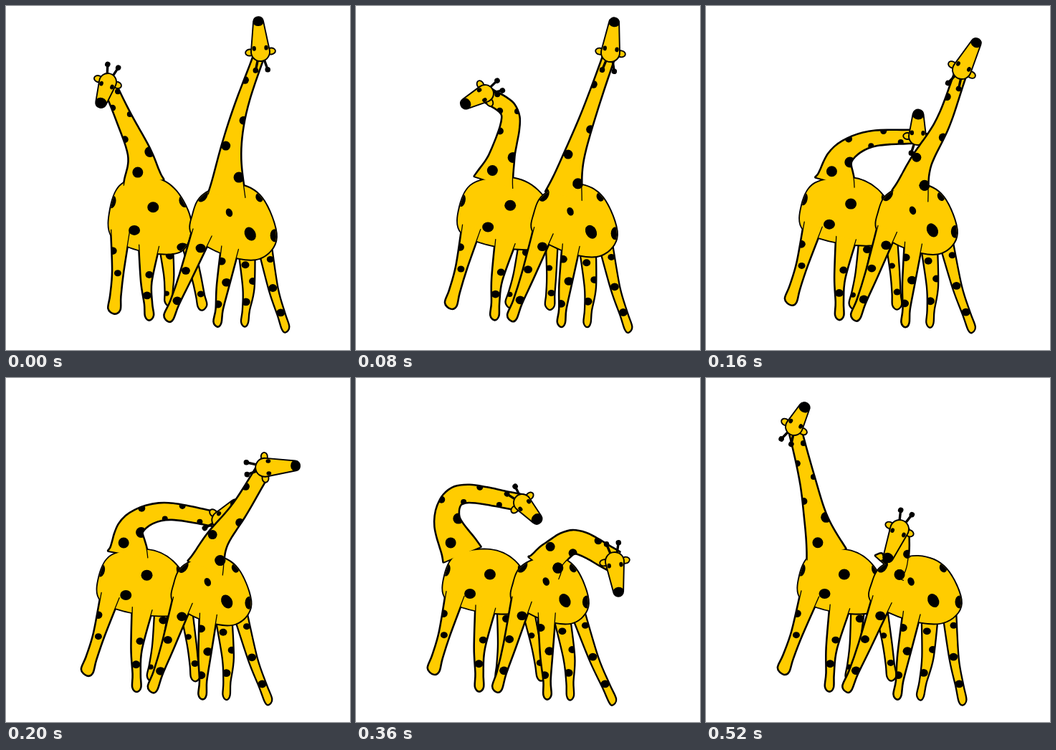
An HTML page with a canvas that plays this animation: 480x480 px, repeating every 600 ms.

```html
<!DOCTYPE html>
<html lang="en">
<head>
<meta charset="utf-8">
<title>Dancing giraffes</title>
<style>
html, body { margin: 0; width: 100%; height: 100%; overflow: hidden; background: #fff; }
canvas { display: block; }
</style>
</head>
<body>
<canvas id="stage" width="480" height="480"></canvas>
<script>
const ctx = document.getElementById('stage').getContext('2d');
const YELLOW = '#fc0', BLACK = '#000', TAU = Math.PI * 2;
const STEP = 40, LOOP = 600, LAST = 13, SETTLED = 7;
const KEYS = [0, 2, 4, 7, 9, 11, 13]; // steps of the key poses
const SPINE = [0, .4, .7, 1];         // places of the spine points along the neck

// Body outline, hips and body spots are fractions of the body box.
// Pose: box left and right, neck base x, two spine points, skull, nose angle, neck half width.
// Spots: body x, y, rx, ry, turn; neck along, across, radius; leg along, across, radius.
const left = {
  poses: [
    [146, 260, 192, 186, 205, 164, 155, 142, 106, 108, 9],
    [145, 280, 192, 205, 205, 215, 150, 180, 122, 152, 10],
    [134, 265, 180, 190, 208, 228, 186, 295, 182, 272, 9],
    [125, 245, 151, 150, 197, 195, 174, 270, 212, 380, 12],
    [124, 245, 148, 127, 195, 148, 162, 232, 174, 408, 11],
    [126, 248, 156, 127, 190, 125, 140, 175, 97, 393, 10],
    [131, 250, 168, 153, 195, 141, 140, 123, 68, 298, 8.5]],
  top: 238, bottom: [345, 328], neckY: 246, neckWidth: 28,
  skull: 12, muzzle: 7.5, face: 30,
  body: [[.02, .78], [0, .42], [.14, .1], [.52, .02], [.8, .19], [.98, .6], [.86, .97], [.4, .97]],
  bodySpots: [[.52, .4, 8, 7.5, 0], [.29, .7, 8, 7, 0], [.02, .33, 5, 9, .2],
    [.9, .32, 7, 9, -.3], [.88, .92, 8, 6, 0]],
  neckSpots: [[.15, -.3, 7.5], [.38, .9, 7.5], [.55, -.9, 5], [.7, .9, 4], [.8, -.9, 4.5], [.9, .8, 4]],
  far: [
    { hip: [.68, .92], from: [227, 412], to: [200, 417], bend: 2, ease: 2,
      w: [9, 6.5, 5, 5], spots: [[.3, .5, 6], [1.7, -.5, 4]] },
    { hip: [.95, .9], from: [274, 418], to: [259, 416], bend: 1, ease: .8,
      w: [8, 6, 5.5, 6], spots: [[.8, -.5, 4.5], [1.6, .2, 5]] }],
  near: [
    { hip: [.12, .7], from: [151, 423], to: [108, 407], bend: 1, ease: 1.7,
      w: [13, 7.5, 7, 8], spots: [[.5, -.9, 6], [1.05, 0, 5]] },
    { hip: [.47, .9], from: [200, 432], to: [172, 431], bend: -4, ease: .8,
      w: [14, 7, 5, 5.5], spots: [[.8, .4, 5.5], [1.4, -.1, 6]] }]
};

const right = {
  poses: [
    [260, 377, 308, 314, 200, 328, 140, 355, 64, 266, 7],
    [248, 364, 290, 303, 213, 325, 150, 355, 65, 277, 8],
    [240, 350, 285, 300, 218, 331, 162, 357, 89, 298, 8],
    [222, 326, 264, 282, 243, 314, 225, 369, 207, 480, 15],
    [219, 324, 262, 277, 245, 308, 229, 361, 256, 443, 15],
    [226, 336, 260, 268, 245, 293, 229, 317, 262, 462, 16],
    [231, 356, 256, 264, 256, 269, 237, 270, 211, 472, 13]],
  top: 246, bottom: [352, 341], neckY: 265, neckWidth: 26,
  skull: 13, muzzle: 7, face: 42,
  body: [[.01, .7], [.01, .42], [.14, .16], [.52, .03], [.83, .21], [1, .72], [.8, 1], [.4, .95]],
  bodySpots: [[.69, .68, 7.5, 10, -.5], [.44, .4, 4.5, 6, -.4], [.12, .17, 7, 10, .5],
    [.8, .2, 5, 6.5, -.4], [.98, .7, 6, 9, 0]],
  neckSpots: [[.17, .75, 7.5], [.42, -.6, 6.5], [.62, .9, 6], [.84, -.9, 5.5]],
  far: [
    { hip: [.65, .92], from: [333, 441], to: [299, 443], bend: 4, ease: 1.1,
      w: [11, 7.5, 4.5, 4.5], spots: [[.35, -.3, 5.5], [.8, .8, 5.5], [1.4, -.2, 6]] },
    { hip: [.87, .88], from: [390, 449], to: [358, 450], bend: -3, ease: 1.1,
      w: [9, 6, 5, 5], spots: [[.25, .5, 5], [.95, -.1, 6], [1.6, 0, 6]] }],
  near: [
    { hip: [.12, .66], from: [227, 434], to: [197, 432], bend: 1, ease: 1.1,
      w: [14, 8.5, 6, 6.5], spots: [[.36, .5, 7], [.87, -.3, 6], [1.6, .3, 6.5]] },
    { hip: [.45, .86], from: [295, 441], to: [267, 442], bend: -1, ease: 1.1,
      w: [12, 8, 4.5, 5], spots: [[.35, -.8, 6], [.9, .5, 6.5], [1.5, -.4, 6]] }]
};

const mix = (a, b, k) => a + (b - a) * k;
const between = (p, q, k) => [mix(p[0], q[0], k), mix(p[1], q[1], k)];
const sway = (step, ease) => 1 - (1 - Math.min(1, step / SETTLED)) ** ease;

// Smooth value of every number in the rows at x.
function spline(rows, keys, x) {
  let i = 0;
  while (i < keys.length - 2 && x >= keys[i + 1]) i++;
  const span = keys[i + 1] - keys[i], k = (x - keys[i]) / span;
  const slope = (j, n) => {
    const a = Math.max(j - 1, 0), b = Math.min(j + 1, keys.length - 1);
    return (rows[b][n] - rows[a][n]) / (keys[b] - keys[a]) * span;
  };
  return rows[i].map((v, n) => mix(v, rows[i + 1][n], k * k * (3 - 2 * k))
    + slope(i, n) * k * (1 - k) ** 2 - slope(i + 1, n) * k * k * (1 - k));
}

// Adds a curve through the points to a path.
function curve(path, pts, closed, join) {
  const n = pts.length;
  const at = i => closed ? pts[(i + n) % n] : pts[Math.max(0, Math.min(n - 1, i))];
  path[join ? 'lineTo' : 'moveTo'](...pts[0]);
  for (let i = 0; i < (closed ? n : n - 1); i++) {
    const [a, b, c, d] = [at(i - 1), at(i), at(i + 1), at(i + 2)];
    path.bezierCurveTo(b[0] + (c[0] - a[0]) / 6, b[1] + (c[1] - a[1]) / 6,
      c[0] - (d[0] - b[0]) / 6, c[1] - (d[1] - b[1]) / 6, c[0], c[1]);
  }
  return path;
}

// Point beside the line from a to b, at distance w from p.
function beside(p, a, b, w) {
  const d = Math.hypot(b[0] - a[0], b[1] - a[1]) || 1;
  return [p[0] - (b[1] - a[1]) / d * w, p[1] + (b[0] - a[0]) / d * w];
}

function stroke(path, width) {
  ctx.lineWidth = width;
  ctx.stroke(path);
}

function fill(path, color) {
  ctx.fillStyle = color;
  ctx.fill(path);
}

function oval(x, y, rx, ry = rx, turn = 0) {
  const path = new Path2D();
  path.ellipse(x, y, rx, ry, turn, 0, TAU);
  return path;
}

function drawSpots(area, spots) {
  ctx.save();
  ctx.clip(area);
  spots.forEach(s => fill(s, BLACK));
  ctx.restore();
}

function makeLeg(leg, place, step) {
  const hip = place(leg.hip), foot = between(leg.from, leg.to, sway(step, leg.ease));
  const knee = between(hip, foot, .52);
  knee[0] += leg.bend;
  const line = [hip, knee, between(knee, foot, .65), foot];
  const side = sign => line.map((p, i) =>
    beside(p, line[Math.max(0, i - 1)], line[Math.min(3, i + 1)], sign * leg.w[i]));
  const path = curve(new Path2D(), [...side(1), [foot[0], foot[1] + 6], ...side(-1).reverse()]);
  const spots = leg.spots.map(([u, across, r]) => {
    const [x, y] = u < 1 ? between(hip, knee, u) : between(knee, foot, u - 1);
    return oval(x + across * mix(leg.w[0], leg.w[1], Math.min(u, 1)), y, r, r * .9);
  });
  return { path, spots };
}

function makeNeck(giraffe, spine, width) {
  const at = u => spline(spine, SPINE, u);
  const edge = (u, across) => beside(at(u), at(u - .01), at(u + .01),
    across * mix(width, giraffe.neckWidth, (1 - u) ** 2));
  const side = across => Array.from({ length: 13 }, (_, i) => edge(i / 12, across));
  const front = side(-1), back = side(1);
  const path = curve(curve(new Path2D(), front), [...back].reverse(), false, true);
  path.closePath();
  const spots = giraffe.neckSpots.map(([u, across, r]) => oval(...edge(u, across), r));
  return { path, spots, lines: [front, back].map(e => curve(new Path2D(), e)) };
}

function drawHead({ skull, muzzle, face }, x, y, angle) {
  ctx.save();
  ctx.translate(x, y);
  ctx.rotate(angle * TAU / 360);
  for (const side of [-1, 1]) {
    const horn = new Path2D(), tip = [-skull * 1.95, side * skull * .65];
    horn.moveTo(-skull * .7, side * skull * .3);
    horn.lineTo(...tip);
    stroke(horn, 3.4);
    fill(oval(...tip, 3.8), BLACK);
    const ear = oval(0, side * skull * 1.15, 4.5, 6);
    fill(ear, YELLOW);
    stroke(ear, 1.9);
  }
  const shape = new Path2D(), lean = Math.acos((skull - muzzle) / face);
  shape.arc(0, 0, skull, lean, TAU - lean);
  shape.arc(face, 0, muzzle, -lean, lean);
  shape.closePath();
  fill(shape, YELLOW);
  drawSpots(shape, [oval(face + 1, 0, muzzle, muzzle + 1),
    ...[-1, 1].map(side => oval(skull * .4, side * skull * .65, 3.4, 2.7))]);
  stroke(shape, 1.9);
  ctx.restore();
}

function drawGiraffe(giraffe, step) {
  const [x0, x1, baseX, ax, ay, bx, by, headX, headY, angle, width] = spline(giraffe.poses, KEYS, step);
  const bottom = mix(...giraffe.bottom, sway(step, 1.4));
  const place = ([u, v]) => [mix(x0, x1, u), mix(giraffe.top, bottom, v)];

  for (const leg of giraffe.far.map(l => makeLeg(l, place, step))) {
    stroke(leg.path, 3.4);
    fill(leg.path, YELLOW);
    drawSpots(leg.path, leg.spots);
    stroke(leg.path, 1.2);
  }

  const neck = makeNeck(giraffe, [[baseX, giraffe.neckY], [ax, ay], [bx, by], [headX, headY]], width);
  const body = curve(new Path2D(), giraffe.body.map(place), true);
  const legs = giraffe.near.map(l => makeLeg(l, place, step));
  const parts = [body, neck.path, ...legs.map(l => l.path)];
  parts.forEach(p => stroke(p, 3.8));
  parts.forEach(p => fill(p, YELLOW));

  const bodySpots = giraffe.bodySpots.map(([u, v, ...size]) => oval(...place([u, v]), ...size));
  drawSpots(body, [...bodySpots, ...neck.spots]);
  drawSpots(neck.path, [...bodySpots, ...neck.spots]);
  legs.forEach(l => drawSpots(l.path, l.spots));
  [...neck.lines, ...legs.map(l => l.path)].forEach(p => stroke(p, 1.3));
  drawHead(giraffe, headX, headY, angle);
}

const start = performance.now();
function tick() {
  const step = Math.min(LAST, Math.floor((performance.now() - start) % LOOP / STEP));
  ctx.fillStyle = '#fff';
  ctx.fillRect(0, 0, 480, 480);
  ctx.strokeStyle = BLACK;
  ctx.lineCap = ctx.lineJoin = 'round';
  drawGiraffe(left, step);
  drawGiraffe(right, step);
  requestAnimationFrame(tick);
}
tick();
</script>
</body>
</html>
```
